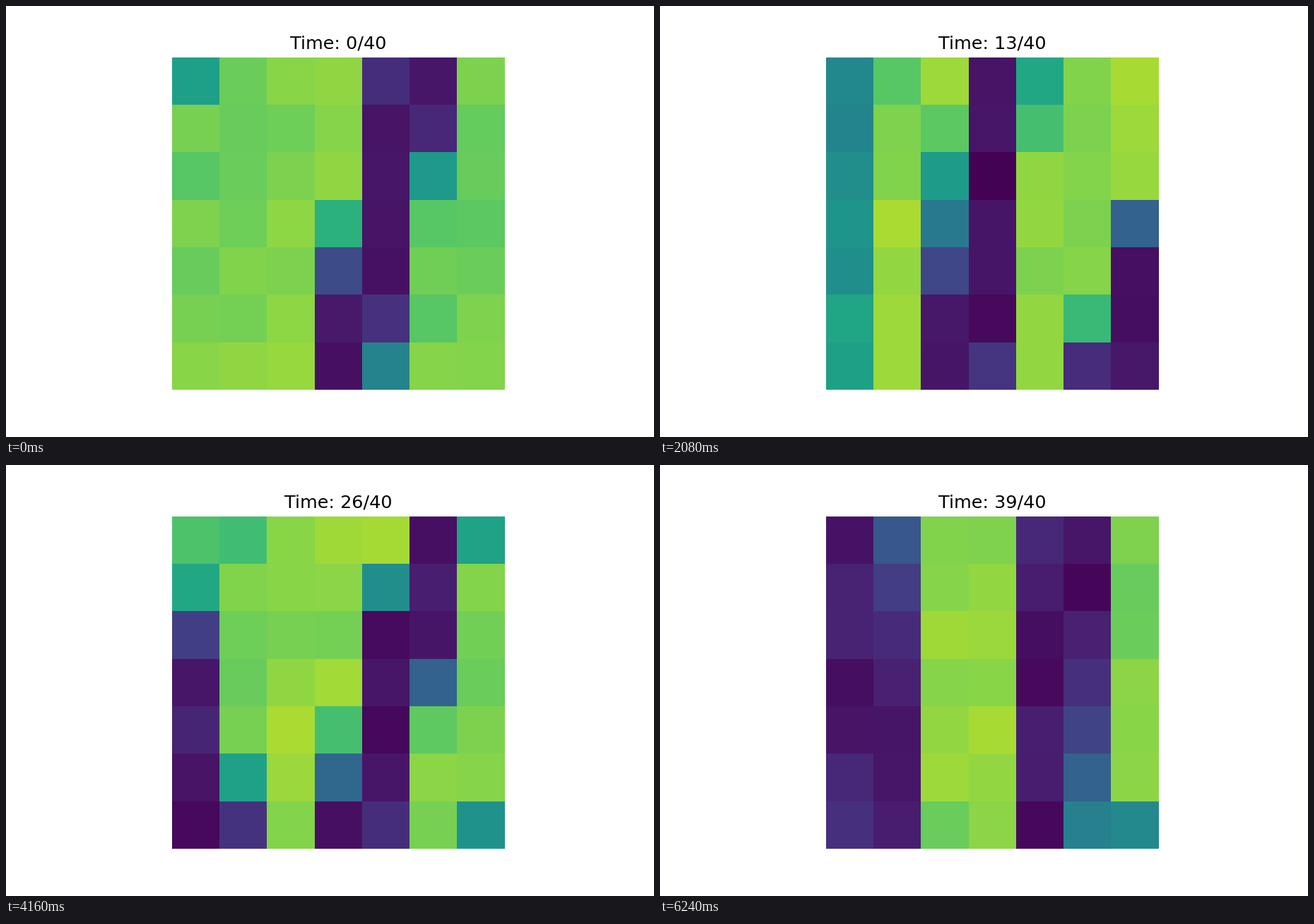
A matplotlib script that plays this animation: 917x611 px, repeating every 6.4 s.

```python
import numpy as np
import matplotlib.pyplot as plt
from matplotlib.animation import FuncAnimation

W, H = 917, 611
DPI = W / 6
STEPS, SIZE = 40, 7

# Quiet waves drifting right: (time, column at the top row, column at the bottom row).
WAVES = [
    [(0, 4.6, 3.2), (5, 8, 5.5), (13, 13, 11)],
    [(0, -0.9, -3), (5, 3.9, 1.6), (13, 7.8, 5.6), (21, 13, 10)],
    [(0, -4, -6), (5, 0, -3), (13, 3.1, 2.4), (21, 9, 6.8)],
    [(5, -4, -4), (13, -0.8, -0.9), (21, 4.5, 2.7), (26, 5.1, 3.4), (33, 7.3, 4.8), (39, 10, 8)],
    [(13, -5, -4), (21, -1.6, -0.1), (26, -1.2, 0.4), (33, 1.9, 2.1), (39, 4.6, 4.2)],
    [(26, -5, -4), (33, -1.4, -0.4), (39, 0.3, 0.6)],
]
ROWS, COLS = np.mgrid[:SIZE, :SIZE]


def smoothstep(x, low, high):
    u = np.clip((x - low) / (high - low), 0, 1)
    return u * u * (3 - 2 * u)


def activity(t):
    gap = np.full((SIZE, SIZE), 4.0)  # distance to the next wave on the right
    awake = np.ones((SIZE, SIZE))
    for wave in WAVES:
        times, tops, bottoms = zip(*wave)
        top, bottom = np.interp(t, times, tops), np.interp(t, times, bottoms)
        offset = top + (bottom - top) * ROWS / (SIZE - 1) - COLS
        gap = np.where(offset > 0, np.minimum(gap, offset), gap)
        awake *= smoothstep(np.abs(offset), 0.45, 1.15)
    # Cells just behind a wave are the most active.
    level = 0.05 + awake * (0.82 - 0.025 * gap)
    noise = np.random.default_rng(t).normal(0, 0.025, level.shape)
    return np.clip(level + noise, 0, 1)


# The tiny margin guards against rounding down to a smaller canvas.
fig, ax = plt.subplots(figsize=((W + 1e-6) / DPI, (H + 1e-6) / DPI), dpi=DPI)
fig.patch.set_facecolor("white")
ax.axis("off")
image = ax.imshow(activity(0), cmap="viridis", vmin=0, vmax=1, interpolation="nearest")
title = ax.set_title(f"Time: 0/{STEPS}", fontsize=12, family="DejaVu Sans")


def update(t):
    image.set_data(activity(t))
    title.set_text(f"Time: {t}/{STEPS}")
    return image, title


anim = FuncAnimation(fig, update, frames=STEPS, interval=160, repeat=True, repeat_delay=0)
plt.show()
```
